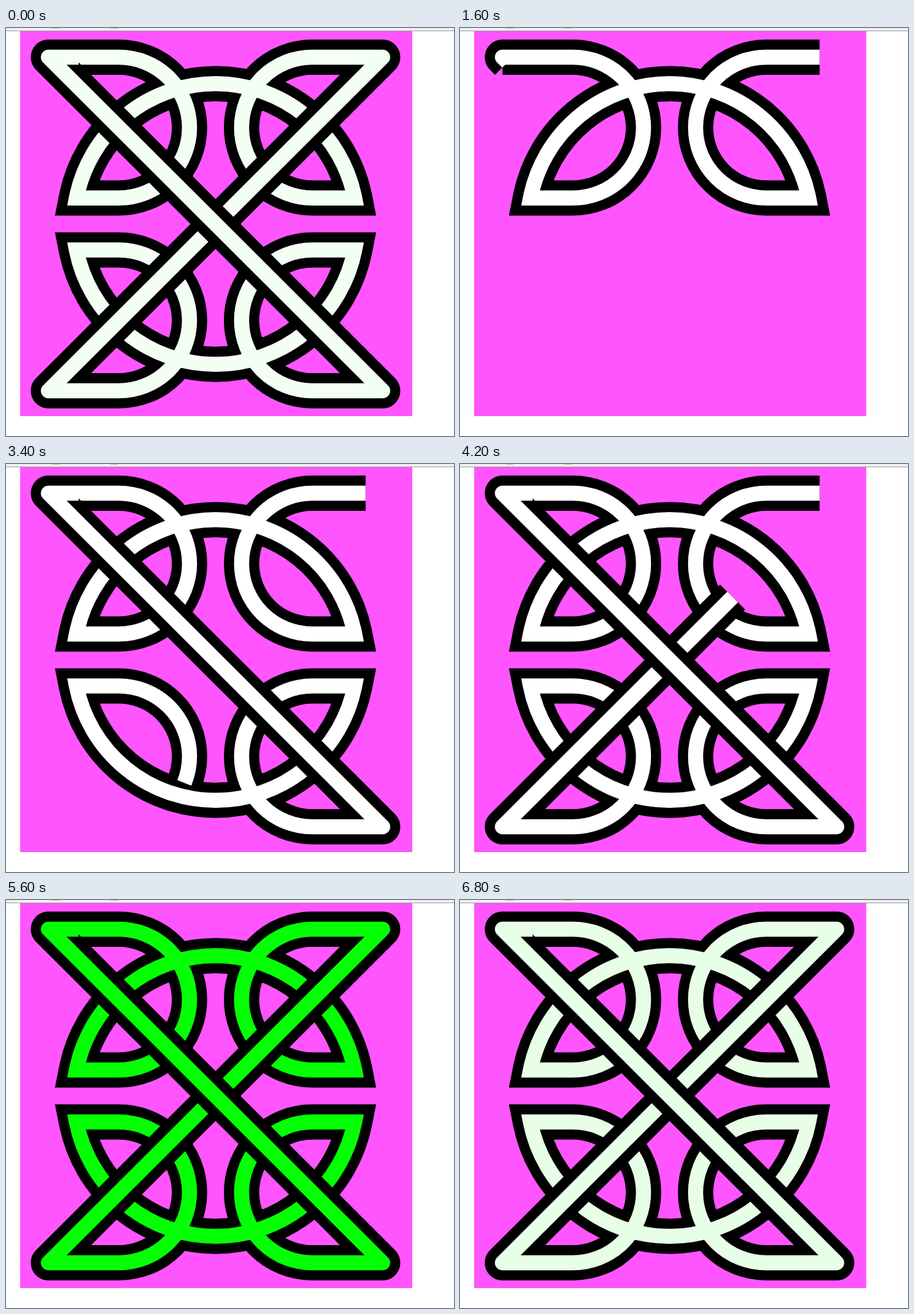
Write an HTML page that moves like this. It is 697 px wide and 636 px high and loops after 7 s.

```html
<!DOCTYPE html>
<html lang="en">
<head>
<meta charset="utf-8">
<title>Celtic knot</title>
<style>
  html, body { margin: 0; width: 100%; height: 100%; overflow: hidden; background: #fff; }
  svg { display: block; }
  #knot path { fill: none; stroke-width: 55; stroke: #000; }
  #knot path.core { stroke-width: 23.5; stroke: var(--core); }
</style>
</head>
<body>
<svg width="697" height="636" viewBox="0 0 697 636">
  <path fill="#f0f0f0" d="M0 0H697V4H0z"/>
  <path fill="#c9bd8a" d="M71 0h12v1h-12zM162 0h12v1h-12z"/>
  <path fill="#a0a0a0" d="M0 4H697V5H0z"/>
  <path fill="#ff55ff" d="M22 5H632V605H22z"/>
  <g id="knot" transform="translate(326 305.5)"></g>
</svg>
<script>
const LOOP = 7000, STEP = 200, DRAW = 1000;
const GREEN_AT = 4535, FADE_AT = 5535, FADE = 2000, RESTART = 535;

// Listed from bottom to top, so the later strands pass over the earlier ones.
const loop = (sweep, dy) => `a109.75 109.75 0 0 ${sweep} 0 ${dy}`;
const strands = [
  { start: 537, join: 'miter',
    d: `M233.5-260H150.25${loop(0, 219.5)}H216.5A220.6 220.6 0 0 0-216.5-40.5H-150.25${loop(0, -219.5)}H-213` },
  { start: 2522, join: 'miter',
    d: `M208 260H150.25${loop(1, -219.5)}H216.5A220.6 220.6 0 0 1-216.5 40.5H-150.25${loop(1, 219.5)}H-209` },
  { start: 3535, join: 'round', d: 'M-209 260H-260L260-260H208' },
  { start: 1530, join: 'round', d: 'M-213-260H-260L260 260H208' },
];

const knot = document.getElementById('knot');
for (const strand of strands) {
  strand.paths = ['edge', 'core'].map(name => {
    const path = document.createElementNS('http://www.w3.org/2000/svg', 'path');
    path.setAttribute('class', name);
    path.setAttribute('d', strand.d);
    path.setAttribute('pathLength', 1);
    path.setAttribute('stroke-linejoin', strand.join);
    return knot.appendChild(path);
  });
}

const clamp = v => Math.min(1, Math.max(0, v));

// The CSS "ease" curve, cubic-bezier(.25, .1, .25, 1).
function ease(x) {
  const bezier = (a, b, u) => 3 * a * u * (1 - u) ** 2 + 3 * b * u * u * (1 - u) + u ** 3;
  let low = 0, high = 1;
  for (let i = 0; i < 24; i++) {
    const mid = (low + high) / 2;
    if (bezier(.25, .25, mid) < x) low = mid; else high = mid;
  }
  return bezier(.1, 1, low);
}

function render(now) {
  let step = Math.floor(now % LOOP / STEP);
  if (step === 1 || step === 32) step--;   // two beats are held
  let t = step * STEP;
  if (t < RESTART) t += LOOP;              // the fade runs past the loop point

  const level = t < GREEN_AT ? 255 : Math.round(255 * ease(clamp((t - FADE_AT) / FADE)));
  knot.style.setProperty('--core', `rgb(${level}, 255, ${level})`);

  for (const { start, paths } of strands) {
    const drawn = clamp((t - start) / DRAW);
    for (const path of paths) {
      path.style.display = drawn ? '' : 'none';
      path.style.strokeDasharray = drawn < 1 ? `${drawn} 2` : 'none';
    }
  }
}

const origin = performance.now();
function tick() {
  render(performance.now() - origin);
  requestAnimationFrame(tick);
}
tick();
</script>
</body>
</html>
```
